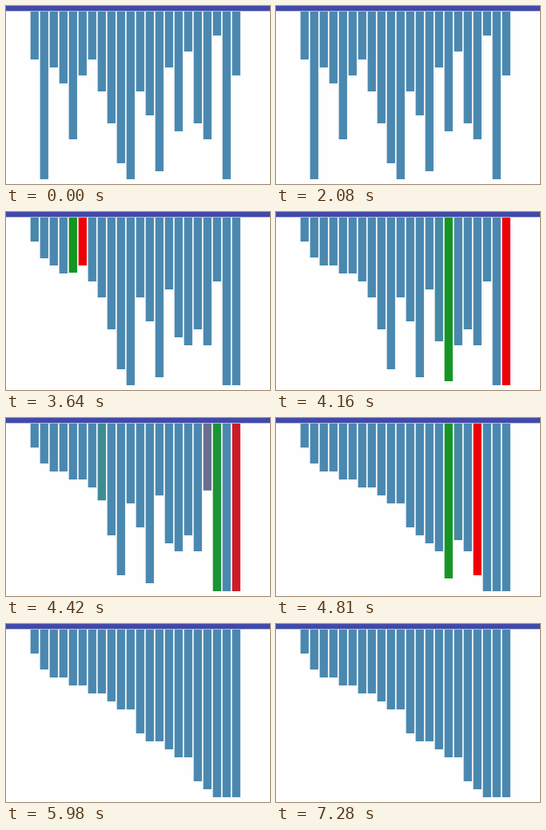
An HTML page for the animation above (7.41 s loop, 330 px wide and 223 px high).

```html
<!DOCTYPE html>
<html lang="en">
<head>
<meta charset="utf-8">
<title>Quicksort</title>
<style>
  html, body { margin: 0; width: 100%; height: 100%; overflow: hidden; background: #fefefe; }
  svg { display: block; width: 100vw; height: 100vh; }
</style>
</head>
<body>
<svg viewBox="0 0 330 223" preserveAspectRatio="none">
  <rect width="330" height="223" fill="#fefefe"/>
  <rect y="6" width="330" height="1" fill="#b4bfcb"/>
  <g id="bars"></g>
  <rect width="330" height="6" fill="#4149ab"/>
</svg>
<script>
const LOOP = 7410, TICK = 130;
const START = [6, 21, 7, 9, 16, 8, 6, 10, 14, 19, 21, 10, 13, 20, 7, 15, 5, 14, 16, 3, 21, 8];
const BLUE = [74, 136, 176], GREEN = [16, 150, 24], RED = [238, 0, 8];
const TOP = 7, UNIT = 10, STEP = 12, LEFT = 30.6, WIDTH = 10.3;

// Time in ms -> number of swaps completed
const PACE = [[3208, 0], [3640, 8.95], [4160, 19.917], [4810, 33.1], [5330, 43.95], [5635, 50]];

// Record the list after every swap, with the two marked bars
function record(start) {
  const list = start.slice();
  const states = [];
  const save = (green, red) => states.push(list.map((value, i) => ({
    value,
    color: i === red ? RED : i === green ? GREEN : BLUE
  })));
  const swap = (a, b, green, red) => {
    [list[a], list[b]] = [list[b], list[a]];
    save(green, red);
  };
  const sort = (lo, hi) => {
    if (lo >= hi) return;
    let mid = lo;
    for (let j = lo; j < hi; j++) {
      if (list[j] < list[hi]) swap(mid++, j, j, hi);
    }
    swap(mid, hi, mid, hi);
    sort(lo, mid - 1);
    sort(mid + 1, hi);
  };
  save();
  sort(0, list.length - 1);
  save();
  return states;
}

const states = record(START);
const last = states.length - 1;
const mix = (a, b, k) => a + (b - a) * k;

function progress(t) {
  if (t <= PACE[0][0]) return 0;
  for (let i = 1; i < PACE.length; i++) {
    const [t0, p0] = PACE[i - 1], [t1, p1] = PACE[i];
    if (t <= t1) return Math.min(last, mix(p0, p1, (t - t0) / (t1 - t0)));
  }
  return last;
}

const group = document.getElementById('bars');
const bars = START.map((_, i) => {
  const bar = document.createElementNS('http://www.w3.org/2000/svg', 'rect');
  bar.setAttribute('x', LEFT + i * STEP);
  bar.setAttribute('y', TOP);
  bar.setAttribute('width', WIDTH);
  group.appendChild(bar);
  return bar;
});

function draw(t) {
  const p = progress(t);
  const n = Math.min(Math.floor(p), last - 1);
  const k = p - n;
  bars.forEach((bar, i) => {
    const a = states[n][i], b = states[n + 1][i];
    const rgb = a.color.map((c, ch) => Math.round(mix(c, b.color[ch], k)));
    bar.setAttribute('height', mix(a.value, b.value, k) * UNIT);
    bar.setAttribute('fill', `rgb(${rgb})`);
  });
}

const begin = performance.now();
function frame() {
  const t = (performance.now() - begin) % LOOP;
  draw(Math.floor(t / TICK) * TICK);
  requestAnimationFrame(frame);
}
draw(0);
requestAnimationFrame(frame);
</script>
</body>
</html>
```
